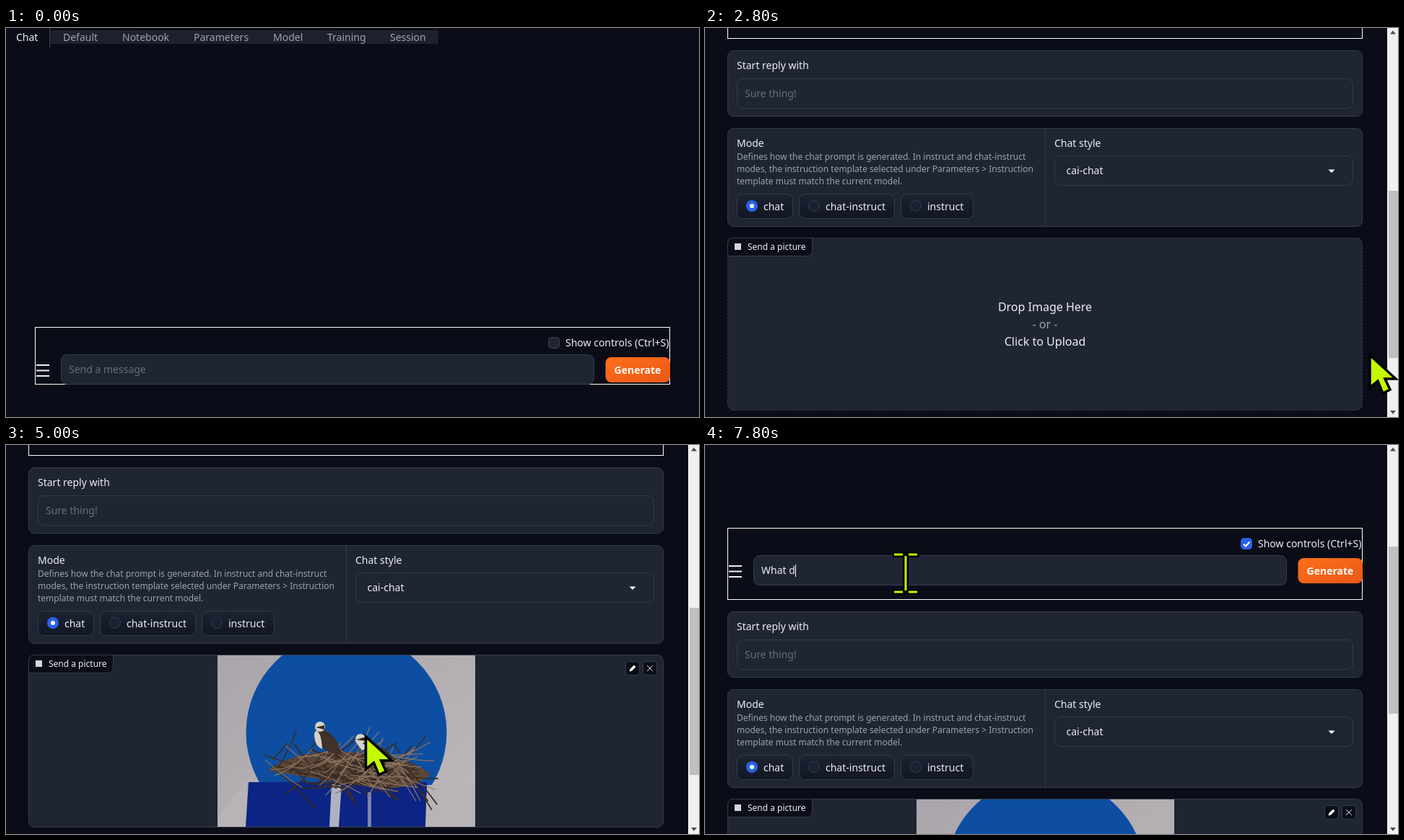
Recreate the animation shown at these times as an HTML page. Size 960 by 540 pixels, loop 8 s.

```html
<!DOCTYPE html>
<html lang="en">
<head>
<meta charset="utf-8">
<title>Sending a picture in chat</title>
<style>
  html, body { margin: 0; width: 100%; height: 100%; overflow: hidden; background: #0a0d17; }
  svg#stage { display: block; width: 960px; height: 540px; }
  text { font: 14px "Noto Sans", sans-serif; fill: #eceef2; white-space: pre; }
  .small { font-size: 12px; }
  .large { font-size: 16px; text-anchor: middle; }
  .muted { fill: #9ca3af; }
  .hint { fill: #666e7c; }
  .strong { font-weight: 600; text-anchor: middle; fill: #fff; }
  .card, .field { fill: #1f2533; stroke: #343c4b; }
  .pill { fill: url(#pillFill); stroke: #343c4b; }
  .dark { fill: #0b0e18; stroke: #343c4b; }
  .radio { fill: #1b2130; stroke: #343c4b; }
  .cursor { fill: #c4fa00; stroke: #000; stroke-width: 3.5; stroke-linejoin: miter; }
</style>
</head>
<body>
<svg id="stage" viewBox="0 0 960 540">
  <defs>
    <linearGradient id="orange" x2="1" y2="1">
      <stop stop-color="#ff6f1a"/><stop offset="1" stop-color="#ea5817"/>
    </linearGradient>
    <linearGradient id="pillFill" x2="0" y2="1">
      <stop stop-color="#1d2331"/><stop offset="1" stop-color="#121624"/>
    </linearGradient>
    <linearGradient id="wall" x2="1" y2="1">
      <stop stop-color="#aaa5aa"/><stop offset="1" stop-color="#bdb8ba"/>
    </linearGradient>
    <symbol id="photo" viewBox="0 0 357 238">
      <rect width="357" height="238" fill="url(#wall)"/>
      <circle cx="178.500" cy="107" r="139" fill="#0d4ea2"/>
      <path d="M0 238V225L40 174V238Z M290 180H357V238H290Z" fill="#b8b3b6"/>
      <path d="M43 176H290L288 238H39Z" fill="#0c2483"/>
      <path d="M158 178H172L168 238H155Z" fill="#aeb2c0"/>
      <path d="M208 190H213V238H208Z" fill="#7a85ad"/>
      <path d="M70 160Q110 128 190 135T295 165Q270 190 210 182T70 160Z" fill="#5b4637"/>
      <path id="twigsDark" fill="none" stroke="#3a2c25" stroke-width="1.700"/>
      <path id="twigsLight" fill="none" stroke="#8d7460" stroke-width="1.200"/>
      <path d="M136 106Q150 98 166 120L172 138Q142 138 136 106Z M196 122Q215 112 246 144L212 142Z" fill="#40312a"/>
      <path d="M137 104Q144 108 145 130Q134 126 134 108Z M190 118Q198 118 208 128L200 132Z" fill="#d8d0c8"/>
      <circle cx="142" cy="99" r="7" fill="#d8d0c8"/>
      <circle cx="198" cy="116" r="7" fill="#d8d0c8"/>
      <path d="M136 100L148 97V103Z M192 117L206 113V119Z" fill="#342822"/>
    </symbol>
  </defs>

  <g id="page">
    <g id="tabs">
      <rect x="61" y="3" width="538" height="19" fill="#1d202d"/>
      <path d="M60.500 0V27" stroke="#3a404d"/>
      <text x="14" y="18" fill="#fff">Chat</text>
    </g>
    <g id="column">
      <rect id="frame" x="31.500" y="415.500" width="879" height="79" fill="none" stroke="#fff"/>
      <rect id="box" x="742.500" y="429.500" width="15" height="15" rx="4"/>
      <path id="tick" d="M746 437.500L749 440.500L754.500 434.500" fill="none" stroke="#fff" stroke-width="2"/>
      <text x="766" y="442">Show controls (Ctrl+S)</text>
      <path d="M33 468H51M33 475.500H51M33 483H51" stroke="#eceef2" stroke-width="2"/>
      <rect class="field" x="67.500" y="453.500" width="738" height="41" rx="8"/>
      <text id="message" x="78" y="479"></text>
      <path id="caret" d="M0 466V483" stroke="#fff"/>
      <rect x="821.500" y="457" width="89.500" height="35" rx="8" fill="url(#orange)"/>
      <text class="strong" x="866" y="480">Generate</text>

      <g id="controls">
        <rect class="card" x="31.500" y="531.500" width="879" height="91" rx="8"/>
        <text x="44" y="557">Start reply with</text>
        <rect class="field" x="44.500" y="570.500" width="853" height="41" rx="8"/>
        <text class="hint" x="55" y="596">Sure thing!</text>

        <rect class="card" x="31.500" y="639.500" width="879" height="136" rx="8"/>
        <path d="M471.500 640V775" stroke="#343c4b"/>
        <text x="44" y="665">Mode</text>
        <text class="small muted" x="44" y="683">Defines how the chat prompt is generated. In instruct and chat-instruct</text>
        <text class="small muted" x="44" y="700">modes, the instruction template selected under Parameters &gt; Instruction</text>
        <text class="small muted" x="44" y="717">template must match the current model.</text>
        <g id="radios"></g>
        <text x="484" y="665">Chat style</text>
        <rect class="field" x="484.500" y="677.500" width="413" height="41" rx="8"/>
        <text x="500.500" y="703">cai-chat</text>
        <path d="M863.500 696.500H872.500L868 701Z" fill="#fff"/>

        <rect id="drop" class="card" x="31.500" y="791.500" width="879" height="239" rx="8"/>
        <g id="prompt">
          <text class="large" x="471" y="893">Drop Image Here</text>
          <text class="large muted" x="471" y="917">- or -</text>
          <text class="large" x="471" y="941">Click to Upload</text>
        </g>
        <g id="upload">
          <use href="#photo" x="293" y="792" width="357" height="238"/>
          <rect class="dark" x="858.500" y="800.500" width="19" height="19" rx="4"/>
          <rect class="dark" x="882.500" y="800.500" width="19" height="19" rx="4"/>
          <path d="M864 814L865 811L870 806L872 808L867 813Z" fill="#fff" stroke="#fff"/>
          <path d="M888 806L896 814M896 806L888 814" stroke="#d5d8de"/>
        </g>
        <path class="dark" d="M31.500 816.500V799.500Q31.500 791.500 39.500 791.500H148.500V808.500Q148.500 816.500 140.500 816.500Z"/>
        <rect x="41" y="799" width="9" height="9" fill="#d6d6d8"/>
        <text class="small" x="59" y="808">Send a picture</text>
      </g>
    </g>
  </g>

  <g id="scrollbar">
    <rect x="945" width="15" height="540" fill="#f1eff1"/>
    <rect id="thumb" x="947" width="13" height="232" fill="#c1bfc1"/>
    <path d="M949 8.500H957L953 3.500Z M949 531H957L953 536Z" fill="#505050"/>
  </g>

  <g id="viewer">
    <rect x="-672" width="840" height="540" fill="#2e2f2d"/>
    <use href="#photo" x="-515" y="45" width="590" height="393.300"/>
    <rect x="95" width="66" height="27" fill="#4d4d4e"/>
    <text x="102" y="18" style="font:600 13.500px Inter, sans-serif">Close</text>
    <path d="M143 7L154 18M154 7L143 18" stroke="#fff" stroke-width="1.500"/>
    <path d="M145 214L160 229L145 244" fill="none" stroke="#fff" stroke-width="3"/>
  </g>

  <g id="arrow" class="cursor">
    <path d="M1 4V49L12 40L19 57L29 52L22 37H37Z"/>
  </g>
  <g id="hand" class="cursor">
    <path d="M-5 6Q-5 0 0 0T6 6V23Q11 20 15 25Q20 22 23 27Q32 25 32 34V51Q32 61 26 70H0Q-10 61 -21 45Q-25 38 -19 35Q-14 34 -5 43Z"/>
  </g>
  <g id="beam" fill="none">
    <path d="M-18 -26H19M-18 26H19M0 -28V28" stroke="#000" stroke-width="8"/>
    <path d="M-16 -26H-4M4 -26H16M-16 26H-4M4 26H16M0 -24V24" stroke="#c4fa00" stroke-width="3"/>
  </g>
  <g id="drag">
    <use href="#photo" x="-140" y="-97" width="200" height="133.300" opacity=".6"/>
    <path d="M4 53H47V80H4Z" fill="none" stroke="#000" stroke-width="3"/>
    <path d="M4 53H47V80H4Z" fill="none" stroke="#fff" stroke-width="2" stroke-dasharray="3 3"/>
    <path d="M1 3V44L10 36L19 57L26 54L19 33H31Z" fill="#fff" stroke="#000" stroke-width="3"/>
    <rect x="34.500" y="67.500" width="35" height="34" fill="#fff" stroke="#000" stroke-width="3"/>
    <path d="M42 84.500H63M52.500 74V95" stroke="#000" stroke-width="7"/>
  </g>
</svg>

<script>
const $ = id => document.getElementById(id);
const show = (id, on) => $(id).setAttribute('display', on ? 'inline' : 'none');
const move = (id, x, y) => $(id).setAttribute('transform', `translate(${x} ${y})`);

const LOOP = 8000, STEP = 200;

// Rows are [time, ...values]; values between rows are linear.
const SCROLL = [[2200, 0], [2400, 50], [2600, 300], [2800, 500], [5400, 500], [5600, 494], [5800, 410], [6000, 325], [6200, 300]];
const POINTER = [
  [200, 874, 520], [600, 795, 465], [800, 760, 438], [1600, 760, 438],
  [1800, 785, 441], [2200, 920, 450], [3200, 920, 450], [3400, 600, 425], [3800, 10, 345],
  [4200, 190, 355], [4400, 441, 384], [4600, 455, 392], [4800, 455, 392],
  [5200, 540, 410], [5600, 725, 432], [5800, 650, 395], [6200, 330, 228], [6400, 282, 203],
  [6600, 278, 178]
];
const CURSORS = [[0, ''], [200, 'arrow'], [800, 'hand'], [1800, 'arrow'], [4000, ''], [4200, 'drag'],
  [4800, 'arrow'], [5400, 'hand'], [5800, 'arrow'], [6600, 'beam']];

function sample(rows, t) {
  const next = rows.findIndex(row => row[0] > t);
  if (next === 0) return rows[0].slice(1);
  if (next < 0) return rows.at(-1).slice(1);
  const a = rows[next - 1], b = rows[next];
  const k = (t - a[0]) / (b[0] - a[0]);
  return a.slice(1).map((v, i) => v + (b[i + 1] - v) * k);
}

function buildTabs() {
  const names = ['Default', 'Notebook', 'Parameters', 'Model', 'Training', 'Session'];
  const lefts = [79, 161, 260, 370, 445, 532];
  $('tabs').innerHTML += names.map((name, i) =>
    `<text class="muted" x="${lefts[i]}" y="18">${name}</text>`).join('');
}

function buildRadios() {
  const options = [['chat', 44, 78], ['chat-instruct', 130, 133], ['instruct', 271, 101]];
  $('radios').innerHTML = options.map(([name, x, width], i) => `
    <rect class="pill" x="${x + .5}" y="730.5" width="${width - 1}" height="34" rx="8"/>
    <circle class="radio" cx="${x + 21}" cy="747" r="7.500"/>
    ${i ? '' : '<circle cx="65" cy="747" r="8" fill="#2a61ea"/><circle cx="65" cy="747" r="3" fill="#fff"/>'}
    <text x="${x + 37}" y="753">${name}</text>`).join('');
}

function buildTwigs() {
  let seed = 7;
  const random = () => (seed = seed * 16807 % 2147483647) / 2147483647;
  const twig = () => {
    const x = 65 + 245 * (random() + random()) / 2, y = 132 + 48 * random();
    const angle = (random() - .5) * 2.4, length = 15 + 32 * random();
    const dx = Math.cos(angle) * length, dy = Math.sin(angle) * length;
    return `M${x - dx} ${y - dy * .6}Q${x} ${y + 10 * random()} ${x + dx} ${y + dy}`;
  };
  const bundle = count => Array.from({ length: count }, twig).join('');
  $('twigsDark').setAttribute('d', bundle(65));
  $('twigsLight').setAttribute('d', bundle(50));
}

function drawMessage(t) {
  const typed = 'What d'.slice(0, Math.max(0, Math.floor((t - 6900) / 150)));
  const message = $('message');
  message.textContent = typed || 'Send a message';
  message.setAttribute('class', typed ? '' : 'hint');
  show('caret', t >= 6800);
  move('caret', typed ? 78.5 + Math.round(message.getComputedTextLength()) : 78.5, 0);
}

function draw(t) {
  const open = t >= 1400, checked = t >= 1200;
  const dragging = t >= 4200 && t < 4800, uploaded = t >= 4800;
  const [scroll] = sample(SCROLL, t);

  move('page', 0, -Math.round(scroll));
  move('column', open ? 0 : 9, 0);
  $('frame').setAttribute('height', open ? 99 : 79);
  show('controls', open);
  show('scrollbar', open);
  $('thumb').setAttribute('y', Math.round(14 + scroll * .424));

  $('box').setAttribute('fill', checked ? '#2a61ea' : '#1f2533');
  $('box').setAttribute('stroke', checked ? '#2a61ea' : '#3a4250');
  show('tick', checked);

  $('drop').style.stroke = dragging ? '#d9713c' : '';
  $('drop').style.strokeDasharray = uploaded ? 'none' : '3 2';
  show('prompt', !uploaded);
  show('upload', uploaded);
  show('viewer', t >= 3800 && t < 5000);
  drawMessage(t);

  const active = CURSORS.findLast(row => row[0] <= t)[1];
  for (const id of ['arrow', 'hand', 'beam', 'drag']) show(id, id === active);
  if (active) move(active, ...sample(POINTER, t));
}

buildTabs();
buildRadios();
buildTwigs();

const start = performance.now();
function tick() {
  const t = (performance.now() - start) % LOOP;
  draw(Math.floor(t / STEP) * STEP);
  requestAnimationFrame(tick);
}
tick();
</script>
</body>
</html>
```
